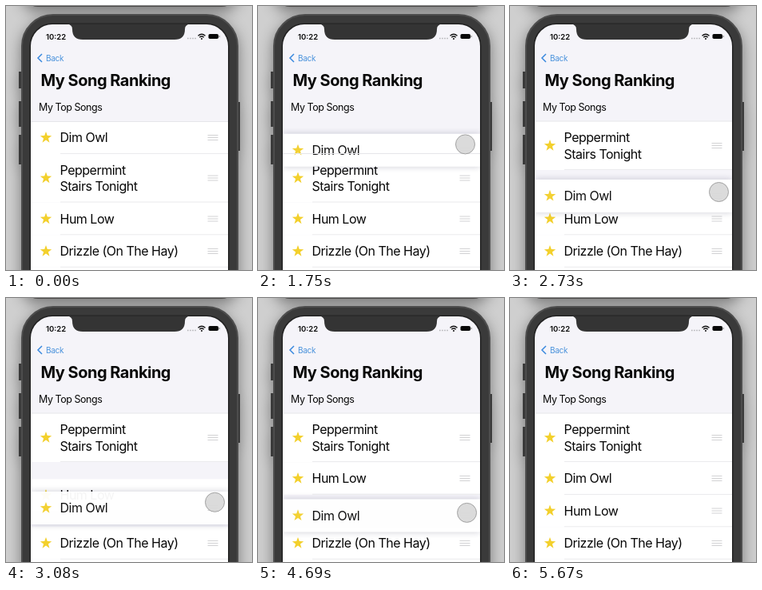
Write an HTML page that moves like this. It is 308 by 330 pixels and loops after 7.35 s.

```html
<!DOCTYPE html>
<html lang="en">
<head>
<meta charset="utf-8">
<title>My Song Ranking</title>
<style>
  html, body { margin: 0; width: 100%; height: 100%; overflow: hidden; background: #cfcfcf; }
  svg { display: block; width: 308px; height: 330px; font-family: Inter, "Open Sans", sans-serif; fill: #080808; }
  .song { font-size: 16px; letter-spacing: -.5px; }
  .shadow { filter: drop-shadow(0 6px 9px rgba(0, 0, 0, .42)); }
</style>
</head>
<body>
<svg viewBox="0 0 308 330">
  <defs>
    <clipPath id="screen"><rect x="31" y="23" width="247" height="400" rx="27"/></clipPath>
    <path id="star" fill="#f3d02c"/>
    <path id="grip" d="M252.5 -3h13M252.5 0h13M252.5 3h13" stroke="#d2d2d4"/>
  </defs>
  <rect width="308" height="330" fill="#cfcfcf"/>
  <rect class="shadow" x="20" y="-60" width="270" height="61" rx="20" fill="#4c4a49"/>
  <g class="shadow" fill="#3a3a3a">
    <path d="M16 82h5v21h-5zM16 119h5v32h-5zM16 161h5v37h-5zM288 120h5v61h-5z"/>
    <rect x="20" y="11" width="270" height="420" rx="39" stroke="#4d4d4d" stroke-width="2"/>
  </g>
  <rect x="30.5" y="22.5" width="248" height="401" rx="27.5" fill="none" stroke="#222" stroke-width="2"/>
  <g clip-path="url(#screen)">
    <rect x="31" y="23" width="247" height="310" fill="#f5f4f9"/>
    <rect x="31" y="327" width="247" height="4" fill="#fff"/>
    <g id="list"></g>
    <path id="topLine" d="M31 .5h247" stroke="#e6e6ea"/>
  </g>
  <path d="M76 22.5Q83 23 83 29Q83 42 96 42H211Q224 42 224 29Q224 23 231 22.5Z" fill="#343434"/>
  <text x="50" y="41.5" font-size="9.5" font-weight="600">10:22</text>
  <path d="M227 40.5h11" stroke="#b5b5b8" stroke-width="1.6" stroke-dasharray="1.6 1.5"/>
  <path d="M240.5 37.3q4.5 -4 9 0M242.3 39.3q2.7 -2.4 5.4 0" fill="none" stroke="#111" stroke-width="1.4"/>
  <circle cx="245" cy="40.9" r="1"/>
  <rect x="253.5" y="35" width="12.500" height="6" rx="1.8"/>
  <rect x="266.6" y="37" width="1" height="2.2" fill="#777"/>
  <path d="M45 60l-5 5 5 5" fill="none" stroke="#3b8ade" stroke-width="1.5"/>
  <text x="50" y="68.5" font-size="10" letter-spacing="-.3" fill="#4a92dc">Back</text>
  <text x="43.5" y="99.5" font-size="20" font-weight="700" letter-spacing="-.5">My Song Ranking</text>
  <text x="41" y="131" font-size="12.5" letter-spacing="-.45">My Top Songs</text>
  <circle id="finger" r="12" fill="#d8d8d8" fill-opacity=".93" stroke="#a2a2a2"/>
</svg>
<script>
const LOOP = 7350, STEP = 70, ROW = 40.5;
const TOUCH = 1330, RELEASE = 5600;
const $ = id => document.getElementById(id);

$('star').setAttribute('d', 'M' + Array.from({ length: 10 }, (_, i) => {
  const a = i * Math.PI / 5, r = i % 2 ? 3.1 : 7.6;
  return (50 + r * Math.sin(a)).toFixed(2) + ' ' + (-r * Math.cos(a)).toFixed(2);
}).join('L') + 'Z');

function addRow(height, ...lines) {
  const g = document.createElementNS('http://www.w3.org/2000/svg', 'g');
  const text = lines.map((s, i) =>
    `<text class="song" x="67.5" y="${5.8 + (i - (lines.length - 1) / 2) * 20.5}">${s}</text>`).join('');
  g.innerHTML = `<rect x="31" y="${-height / 2}" width="247" height="${height}" fill="#fff"/>
    <path class="line" d="M68 ${height / 2 - .5}h210" stroke="#ebebed"/>
    <use href="#star"/><use href="#grip"/>${text}`;
  $('list').append(g);
  return g;
}

const last = addRow(ROW, 'Drizzle (On The Hay)');
const third = addRow(ROW, 'Hum Low');
const tall = addRow(61, 'Peppermint', 'Stairs Tonight');
const card = addRow(41, 'Dim Owl');
const cardLine = card.querySelector('.line');

function ease(t, from, to) {
  const p = Math.min(1, Math.max(0, (t - from) / (to - from)));
  return p * p * (3 - 2 * p);
}

// Two pulls down, a small slip, then back up
const cardY = t => 164.5 + 72.5 * ease(t, 1470, 2400) + 41 * ease(t, 2690, 3360)
  - 5 * ease(t, 3530, 3780) - 53.5 * ease(t, 4640, 5240) + 6 * ease(t, 5530, 5670);

const place = (el, y, x = 0) => el.setAttribute('transform', `translate(${x} ${y})`);

function draw(t) {
  const up = ease(t, TOUCH, 1610) - ease(t, 5530, 5670);
  const back = ease(t, 4640, 5240);
  const tallY = 215 - ROW * ease(t, 1990, 2380);

  place(last, 306.5);
  place(third, 266 - ROW * (ease(t, 2900, 3270) - ease(t, 4850, 5220)));
  place(tall, tallY);
  place($('topLine'), t < 1400 ? 144 : tallY - 31);

  place(card, cardY(t));
  card.style.opacity = 1 - .04 * up;
  card.style.filter = up ? `drop-shadow(0 0 4px rgba(40, 40, 75, ${.23 * up}))` : 'none';
  cardLine.style.opacity = 1 - up;

  // The finger trails the card slightly and drifts to the right
  place($('finger'), cardY(t - 30) - 4.5 + 4 * back, 259.5 + 2 * ease(t, 2030, 2380) + 3.5 * back);
  $('finger').style.display = t >= TOUCH && t < RELEASE ? '' : 'none';
}

const start = performance.now();
function frame() {
  const t = (performance.now() - start) % LOOP;
  draw(Math.floor(t / STEP) * STEP);
  requestAnimationFrame(frame);
}
frame();
</script>
</body>
</html>
```
